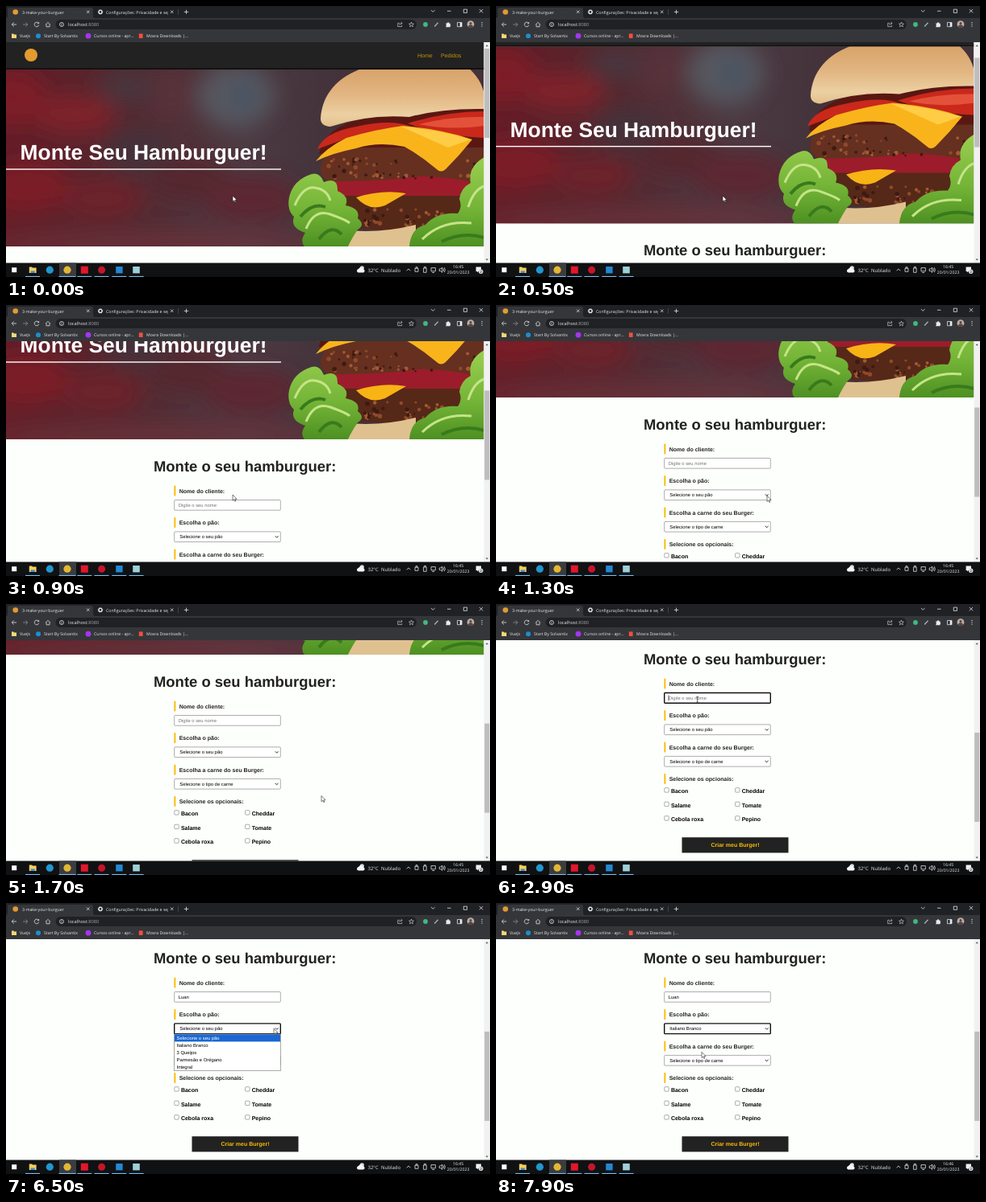
These frames come from a looping animation (600x337 px, 8 s). An HTML page:

```html
<!DOCTYPE html>
<html lang="pt-BR">
<head>
<meta charset="utf-8">
<title>Monte o seu hamburguer</title>
<style>
html, body { margin: 0; width: 100%; height: 100%; overflow: hidden; background: #fff; }
svg { display: block; width: 100vw; height: 100vh; }
text { text-rendering: geometricPrecision; white-space: pre; }
.ui { font-family: "Open Sans", "Noto Sans", sans-serif; font-size: 5.2px; fill: #e8eaed; }
.page { font-family: "Liberation Sans", Arial, sans-serif; }
.bold { font-weight: 700; font-size: 7.03px; fill: #222; }
.field { font-size: 5.86px; }
.line { fill: none; stroke: #dfe1e5; stroke-width: .8; }
</style>
</head>
<body>
<svg id="stage" viewBox="0 0 600 337" preserveAspectRatio="none" xmlns="http://www.w3.org/2000/svg">
  <defs>
    <clipPath id="view"><rect y="45" width="592.5" height="274.5"/></clipPath>
    <clipPath id="hero"><rect y="79" width="592.5" height="220"/></clipPath>
    <clipPath id="tab"><rect x="120" width="81" height="15"/></clipPath>
    <filter id="haze" x="-20%" y="-20%" width="140%" height="140%"><feGaussianBlur stdDeviation="13"/></filter>
    <filter id="soft"><feGaussianBlur stdDeviation=".7"/></filter>
    <linearGradient id="wall">
      <stop offset="0" stop-color="#641d27"/><stop offset=".25" stop-color="#54282f"/>
      <stop offset=".5" stop-color="#4c3a42"/><stop offset=".7" stop-color="#43323a"/>
    </linearGradient>
    <linearGradient id="bun" x2="0" y2="1">
      <stop offset="0" stop-color="#d6a268"/><stop offset=".45" stop-color="#e2b581"/>
      <stop offset=".8" stop-color="#ecd0a2"/><stop offset="1" stop-color="#e3bf8a"/>
    </linearGradient>
    <linearGradient id="leaf" x2="0" y2="1">
      <stop offset="0" stop-color="#9bcf50"/><stop offset=".6" stop-color="#72b336"/><stop offset="1" stop-color="#4d9022"/>
    </linearGradient>
  </defs>

  <rect width="600" height="337" fill="#fdfffc"/>

  <g clip-path="url(#view)"><g id="doc" class="page">
    <rect y="45" width="593" height="34" fill="#222"/>
    <rect y="77.2" width="593" height="1.8" fill="#111"/>
    <circle cx="31" cy="61" r="8" fill="#e39b2f"/>
    <g font-size="7.03" fill="#c4930c"><text x="510" y="63.8">Home</text><text x="539" y="63.8">Pedidos</text></g>

    <g clip-path="url(#hero)">
      <rect y="79" width="593" height="220" fill="url(#wall)"/>
      <g id="blobs" filter="url(#haze)"></g>
      <g filter="url(#soft)">
        <path d="M388 184Q394 152 440 140L520 128 593 122V184Z" fill="#5a1712"/>
        <path d="M390 140C392 110 410 88 446 76H572Q589 90 593 110V128Q540 127 500 138Q450 134 402 150Q390 149 390 140Z" fill="url(#bun)"/>
        <path d="M386 178Q394 157 434 150Q478 140 502 150L424 164ZM498 146Q545 131 593 131V164Q540 162 498 146Z" fill="#c9281b"/>
        <path d="M512 147Q550 137 593 138V149Q550 155 512 147Z" fill="#e4513a"/>
        <path d="M390 200Q392 180 430 176H593V222Q500 236 400 218Q388 212 390 200Z" fill="#65301f"/>
        <path d="M384 193Q396 177 422 164Q460 153 492 149Q540 153 578 166Q562 186 545 203Q539 208 534 203Q514 186 494 175Q462 168 434 177Q404 183 384 193Z" fill="#f9b41c"/>
        <path d="M490 150Q540 154 576 166L548 176Z" fill="#ffcc45"/>
        <path d="M398 218Q470 218 500 213T593 222V238H400Z" fill="#9c1c2b"/>
        <path d="M404 236H593V276Q500 286 404 272Z" fill="#562818"/>
        <path d="M434 238Q466 228 496 233L470 248Q450 256 434 238Z" fill="#f8b315"/>
        <g id="crumbs"></g>
        <path d="M416 278Q460 284 508 272V299H416Z" fill="#dfc190"/>
        <path d="M351 238Q356 216 379 209Q389 206 394 219Q412 212 411 230Q426 236 421 248Q440 252 436 264Q446 272 436 278Q428 290 424 299H370Q364 292 371 282Q352 276 357 262Q348 254 351 238ZM500 299Q502 276 520 272Q534 256 560 258Q566 250 562 240Q564 226 576 220Q572 200 593 188V299Z" fill="url(#leaf)"/>
        <path d="M358 248Q368 224 383 226T402 242M372 277Q382 252 402 259T426 270M516 290Q540 266 577 270M573 250Q580 228 593 224" fill="none" stroke="#c5e487" stroke-width="3"/>
        <path d="M365 262Q380 244 396 250M388 290Q403 270 416 284M540 293Q566 280 593 288" fill="none" stroke="#397a1c" stroke-width="4"/>
      </g>
    </g>
    <text x="17.6" y="191.3" font-size="26.35" font-weight="700" fill="#fff">Monte Seu Hamburguer!</text>
    <rect y="202.3" width="341" height="1.4" fill="#fff"/>

    <g id="form" transform="translate(0 264)"></g>
  </g></g>

  <rect x="592.5" y="45" width="7.5" height="274.5" fill="#f1f1f1"/>
  <rect id="thumb" x="593.2" width="6.1" height="111" fill="#bdbdbd"/>
  <path d="M594.6 50.2L596.2 48.2 597.8 50.2ZM594.6 314.4L596.2 316.4 597.8 314.4Z" fill="#505050"/>

  <g id="browser" class="ui">
    <rect width="600" height="16" fill="#202124"/>
    <path d="M0 15Q2 15 2 12V4Q2 2 5 2H105Q108 2 108 4V12Q108 15 110 15H600V45H0Z" fill="#35363a"/>
    <circle cx="11.7" cy="7.5" r="3.3" fill="#e39b2f"/>
    <text x="20" y="9.5">3-make-your-burguer</text>
    <circle cx="117" cy="7.4" r="2" fill="none" stroke="#e8eaed" stroke-width="1.3"/>
    <circle cx="117" cy="7.4" r="2.8" fill="none" stroke="#e8eaed" stroke-width=".7" stroke-dasharray="1.1 1.1"/>
    <text x="124" y="9.5" clip-path="url(#tab)">Configurações: Privacidade e segurança</text>
    <path class="line" d="M100 5.6L103.4 9M103.4 5.6L100 9M204 5.6L207.4 9M207.4 5.6L204 9M223.5 4.7V10M220.8 7.4H226.2"/>
    <path d="M213.5 4V11" stroke="#5f6368" stroke-width=".5"/>
    <path class="line" d="M527 5.2L529.3 7.3 531.6 5.2M547 6.3H551.5M567.3 4.2H571.5V8.4H567.3ZM586.8 4L591.2 8.4M591.2 4L586.8 8.4"/>
    <path class="line" d="M13 23H7.3M9.8 20.4L7.2 23 9.8 25.6M40.3 21.3A2.8 2.8 0 1 0 40.7 23.8M40.7 20V21.8H38.8M49.2 23.2L52 20.3 54.8 23.2M50 22.6V25.8H54V22.6"/>
    <path class="line" d="M21 23H26.7M24.2 20.4L26.8 23 24.2 25.6" stroke-opacity=".5"/>
    <rect x="61.5" y="17" width="447.5" height="12" rx="6" fill="#202124"/>
    <circle class="line" cx="69" cy="23" r="2.5"/><path class="line" d="M69 22.6V24.4M69 21.3V21.9"/>
    <text x="77" y="25" style="font-size:5.7px">localhost<tspan fill="#9aa0a6">:8080</tspan></text>
    <path class="line" d="M488 21.3H485.7V25.6H490.7V24M487.5 23.8Q488 21.5 491 21.5M489.6 20L491.2 21.5 489.6 23" stroke-opacity=".75"/>
    <path class="line" d="M502.5 20L503.3 22.1 505.5 22.2 503.8 23.6 504.4 25.8 502.5 24.6 500.6 25.8 501.2 23.6 499.5 22.2 501.7 22.1Z" stroke-opacity=".75"/>
    <circle cx="520" cy="23" r="2.9" fill="#41b883"/>
    <path d="M531.2 25.5L535.6 20.8" stroke="#a7b1b7" stroke-width="1.3"/>
    <path d="M545.4 21.4H547A1.1 1.1 0 0 1 549.2 21.4H550.6V23A1.1 1.1 0 0 1 550.6 25V26.2H545.4V24.7A1 1 0 0 0 545.4 22.9Z" fill="#e8eaed"/>
    <path class="line" d="M559.5 20.5H565V25.7H559.5Z"/><rect x="562.8" y="20.5" width="2.3" height="5.3" fill="#e8eaed"/>
    <circle cx="576" cy="22.7" r="4.4" fill="#b9b0ab"/>
    <circle cx="576" cy="21.5" r="1.5" fill="#5a4035"/><path d="M573 25.9Q573.2 23.3 576 23.3T579 25.9Q576 28 573 25.9Z" fill="#5a4035"/>
    <path d="M590 20.1V26" stroke="#dfe1e5" stroke-width="1.1" stroke-dasharray="1.1 1.2"/>
    <path d="M7 34.6H9.4L10.2 35.5H13V40H7Z" fill="#f6d776"/>
    <text x="17" y="39">VueJs</text>
    <circle cx="40" cy="37.2" r="3" fill="#1b8fd0"/><text x="47" y="39">Start By Solvantix</text>
    <circle cx="102" cy="37.2" r="3.4" fill="#a435f0"/><text x="109" y="39">Cursos online - apr...</text>
    <rect x="164.8" y="34.4" width="4.8" height="5.6" fill="#f24e3e"/><text x="174" y="39">Movra Downloads |...</text>
  </g>

  <g id="taskbar" class="ui">
    <rect y="319.5" width="600" height="17.5" fill="#101113"/>
    <rect x="66" y="319.5" width="21" height="17.5" fill="#3b3c3f"/>
    <rect x="7.2" y="325.2" width="6" height="6" fill="#fff"/>
    <path d="M28.8 324.4H32L33 325.6H37.6V332H28.8Z" fill="#f9cf57"/><rect x="30.6" y="329.4" width="5.2" height="2.6" fill="#3d8fd6"/>
    <circle cx="54.3" cy="328.2" r="4.6" fill="#2196cf"/>
    <circle cx="76" cy="328.2" r="4.6" fill="#e2b735"/>
    <rect x="92.8" y="323.7" width="9" height="9" fill="#e2172c"/>
    <circle cx="118.6" cy="328.2" r="4.5" fill="#c4162a"/>
    <rect x="136.2" y="324" width="8.4" height="8.4" fill="#2388d3"/>
    <rect x="157.2" y="324" width="8.6" height="8.4" fill="#9ed0d8"/>
    <g id="running" fill="#76b9ed"></g>
    <circle cx="441.3" cy="325.8" r="2.6" fill="#d9dce0"/>
    <path d="M436.8 331.6A2.4 2.4 0 0 1 437 326.9A3.1 3.1 0 0 1 442.6 327.3A2.2 2.2 0 0 1 443 331.6Z" fill="#f5f6f8"/>
    <g style="font-size:6px"><text x="448.5" y="330.5">32°C</text><text x="465" y="330.5">Nublado</text></g>
    <path class="line" d="M496.6 329.3L499 326.9 501.4 329.3"/>
    <path class="line" d="M507 326.3H511V330.3H507ZM508 326.3V324.7H510V326.3M517.6 326H521.2V331.3H517.6ZM518.4 326V324.4H520.4V326M527 325.6H532.4V329.8H527ZM528.3 331.5H531.1M537.2 327H538.7L540.7 325V331.4L538.7 329.5H537.2ZM542 326.4Q543.3 328.2 542 330M543.3 325.2Q545.5 328.2 543.3 331.2"/>
    <g text-anchor="middle"><text id="clock" x="560.6" y="326">16:45</text><text x="560.6" y="333.3">20/01/2023</text></g>
    <path d="M582.6 324.6H589V330H585.4L584 331.4V330H582.6Z" fill="#f1f1f1"/>
    <circle cx="588.7" cy="330.2" r="2.8" fill="#d5d7da"/><text x="588.7" y="332" text-anchor="middle" style="font-size:4.4px;fill:#111">2</text>
  </g>

  <path id="arrow" d="M0 0V7.2L1.7 5.7 2.8 8.2 3.9 7.7 2.8 5.3H5.1Z" fill="#fff" stroke="#111" stroke-width=".55"/>
  <path id="beam" d="M-1.5-3.6Q0-3.6 0-2.8Q0-3.6 1.5-3.6M0-2.8V2.8M-1.5 3.6Q0 3.6 0 2.8Q0 3.6 1.5 3.6" fill="none" stroke="#222" stroke-width=".7"/>
</svg>

<script>
const LOOP = 8000, STEP = 200;
const $ = id => document.getElementById(id);
const fill = (id, items, draw) => { $(id).innerHTML = items.map(draw).join(""); };

function random(seed) {
  return () => (seed = seed * 16807 % 2147483647) / 2147483647;
}

// Hero backdrop: cx, cy, rx, ry, colour
fill("blobs", [
  [10, 115, 40, 34, "#7d1b26"], [85, 135, 50, 24, "#7e202b"], [150, 100, 34, 22, "#4a343d"],
  [25, 225, 55, 30, "#7b1c27"], [165, 180, 44, 26, "#45323a"], [205, 110, 26, 30, "#58303a"],
  [285, 112, 48, 40, "#57565f"], [295, 112, 18, 22, "#485462"], [225, 215, 50, 24, "#55262f"],
  [305, 240, 60, 30, "#5c2630"], [120, 240, 50, 24, "#6d212b"], [200, 294, 230, 12, "#6b303a"]
], ([x, y, rx, ry, c]) => `<ellipse cx="${x}" cy="${y}" rx="${rx}" ry="${ry}" fill="${c}"/>`);

// Speckled surface of both patties
const rnd = random(41);
fill("crumbs", Array.from({ length: 150 }), (_, i) => {
  const x = 400 + rnd() * 186, low = i % 2;
  const y = low ? 252 + rnd() * 22 : 188 + rnd() * 28;
  const onCheese = !low && x > 490 && x < 572 && y < 209;
  const c = ["#8f4a2c", "#3d1a13", "#a25a36"][i % 3];
  return onCheese ? "" : `<circle cx="${x}" cy="${y}" r="${1 + rnd() * 1.8}" fill="${c}"/>`;
});

fill("running", [33, 76, 97.3, 118.5, 140.3, 161.6],
  x => `<rect x="${x - (x === 76 ? 10.5 : 9)}" y="335.9" width="${x === 76 ? 21 : 18}" height="1.1"/>`);

// Form, in the coordinates it has when scrolled to the end
const label = (text, y) =>
  `<rect x="208.4" y="${y - 6.3}" width="1.9" height="12.7" fill="#fcba03"/>
   <text class="bold" x="214.7" y="${y + 2.5}">${text}</text>`;
const box = (id, y) =>
  `<rect id="${id}" x="208.7" y="${y}" width="131.6" height="12.7" rx=".9" fill="#fff" stroke="#767676" stroke-width=".6"/>`;
const select = (id, y, text) => box(id, y) +
  `<text id="${id}Text" class="field" x="215.3" y="${y + 8.4}" fill="#000">${text}</text>
   <path d="M333.8 ${y + 5.4}L335.7 ${y + 7.3} 337.6 ${y + 5.4}" fill="none" stroke="#111" stroke-width=".9"/>`;
const check = (text, x, y) =>
  `<rect x="${x}" y="${y - 4}" width="5.4" height="5.4" rx=".9" fill="#fff" stroke="#767676" stroke-width=".6"/>
   <text class="bold" x="${x + 8.1}" y="${y + 2.6}" style="fill:#000">${text}</text>`;

const breads = ["Selecione o seu pão", "Italiano Branco", "3 Queijos", "Parmesão e Orégano", "Integral"];
const extras = ["Bacon", "Cheddar", "Salame", "Tomate", "Cebola roxa", "Pepino"];
const ROW = 9, LIST_TOP = 163.4;

$("form").innerHTML =
  `<text x="296.2" y="74.8" font-size="18.45" font-weight="700" fill="#222" text-anchor="middle">Monte o seu hamburguer:</text>` +
  label("Nome do cliente:", 99) + box("name", 110.5) +
  `<text id="nameText" class="field" x="213.7" y="118.9"></text>
   <path id="caret" stroke="#000" stroke-width=".6"/>` +
  label("Escolha o pão:", 138.5) + select("bread", 149.9, breads[0]) +
  label("Escolha a carne do seu Burger:", 178) + select("meat", 189.4, "Selecione o tipo de carne") +
  label("Selecione os opcionais:", 217.4) +
  extras.map((text, i) => check(text, 208.8 + i % 2 * 87.8, 232.7 + (i >> 1) * 17.5)).join("") +
  `<rect x="230.5" y="290.2" width="132" height="19.2" fill="#222"/>
   <text class="bold" x="296.5" y="302.1" text-anchor="middle" style="fill:#fcba03">Criar meu Burger!</text>
   <g id="list">
     <rect x="208.6" y="${LIST_TOP - .3}" width="131.8" height="${breads.length * ROW + .6}" fill="#fff" stroke="#767676" stroke-width=".6"/>
     <rect id="pick" x="208.9" width="131.2" height="${ROW}" fill="#1967d2"/>` +
  breads.map((text, i) => `<text class="field option" x="211.5" y="${LIST_TOP + i * ROW + 6.5}">${text}</text>`).join("") +
  `</g>`;

const options = [...document.querySelectorAll(".option")];

const scrollKeys = [[300, 0], [500, 28.4], [700, 88], [900, 132], [1700, 236], [1900, 264]];
const pointerKeys = [
  [900, 281, 236], [1700, 391, 238.5], [1900, 391, 238.5], [2700, 249.7, 118.7], [5900, 249.7, 118.7],
  [6300, 325, 154], [6500, 332, 156], [6900, 332, 174], [7100, 332, 174], [7300, 274.5, 174],
  [7500, 274.5, 174], [7700, 262, 180], [7900, 255, 185.3]
];
const typing = [[4500, "L"], [4900, "Lu"], [5500, "Lua"], [5700, "Luan"]];

// Linear interpolation between [time, ...values] keys
function at(keys, t) {
  const next = keys.findIndex(k => k[0] > t);
  if (next === 0) return keys[0].slice(1);
  if (next < 0) return keys[keys.length - 1].slice(1);
  const a = keys[next - 1], b = keys[next], p = (t - a[0]) / (b[0] - a[0]);
  return a.slice(1).map((v, i) => v + (b[i + 1] - v) * p);
}

const set = (id, attrs) => {
  for (const key in attrs) $(id).setAttribute(key, attrs[key]);
};
const show = (id, on) => set(id, { visibility: on ? "visible" : "hidden" });
const focus = (id, on) => set(id, { stroke: on ? "#101010" : "#767676", "stroke-width": on ? 1.4 : .6 });

function render(time) {
  const t = Math.max(0, Math.floor((time + 100) / STEP) * STEP - 100);

  const [scroll] = at(scrollKeys, t);
  set("doc", { transform: `translate(0 ${-scroll})` });
  set("thumb", { y: 53 + scroll * .405 });

  const inName = t >= 2900 && t < 6500, inBread = t >= 6500;
  focus("name", inName);
  focus("bread", inBread);

  const typed = typing.filter(k => k[0] <= t).pop();
  $("nameText").textContent = typed ? typed[1] : "Digite o seu nome";
  set("nameText", { fill: typed ? "#000" : "#757575" });
  const caretX = 214 + (typed ? $("nameText").getComputedTextLength() : 0);
  set("caret", { d: `M${caretX} 113.4V120.6` });
  show("caret", inName && !(t >= 3500 && t < 4100));

  const picked = t >= 6900 ? 1 : 0;
  show("list", t >= 6500 && t < 7700);
  set("pick", { y: LIST_TOP + picked * ROW });
  options.forEach((o, i) => o.setAttribute("fill", i === picked ? "#fff" : "#000"));
  $("breadText").textContent = breads[t >= 7700 ? 1 : 0];

  $("clock").textContent = t >= 6700 ? "16:46" : "16:45";

  const [x, y] = at(pointerKeys, t), overText = t >= 2700 && t < 6100;
  for (const id of ["arrow", "beam"]) set(id, { transform: `translate(${x} ${y})` });
  show("arrow", !overText);
  show("beam", overText);
}

function tick() {
  render(performance.now() % LOOP);
  requestAnimationFrame(tick);
}
tick();
</script>
</body>
</html>
```
